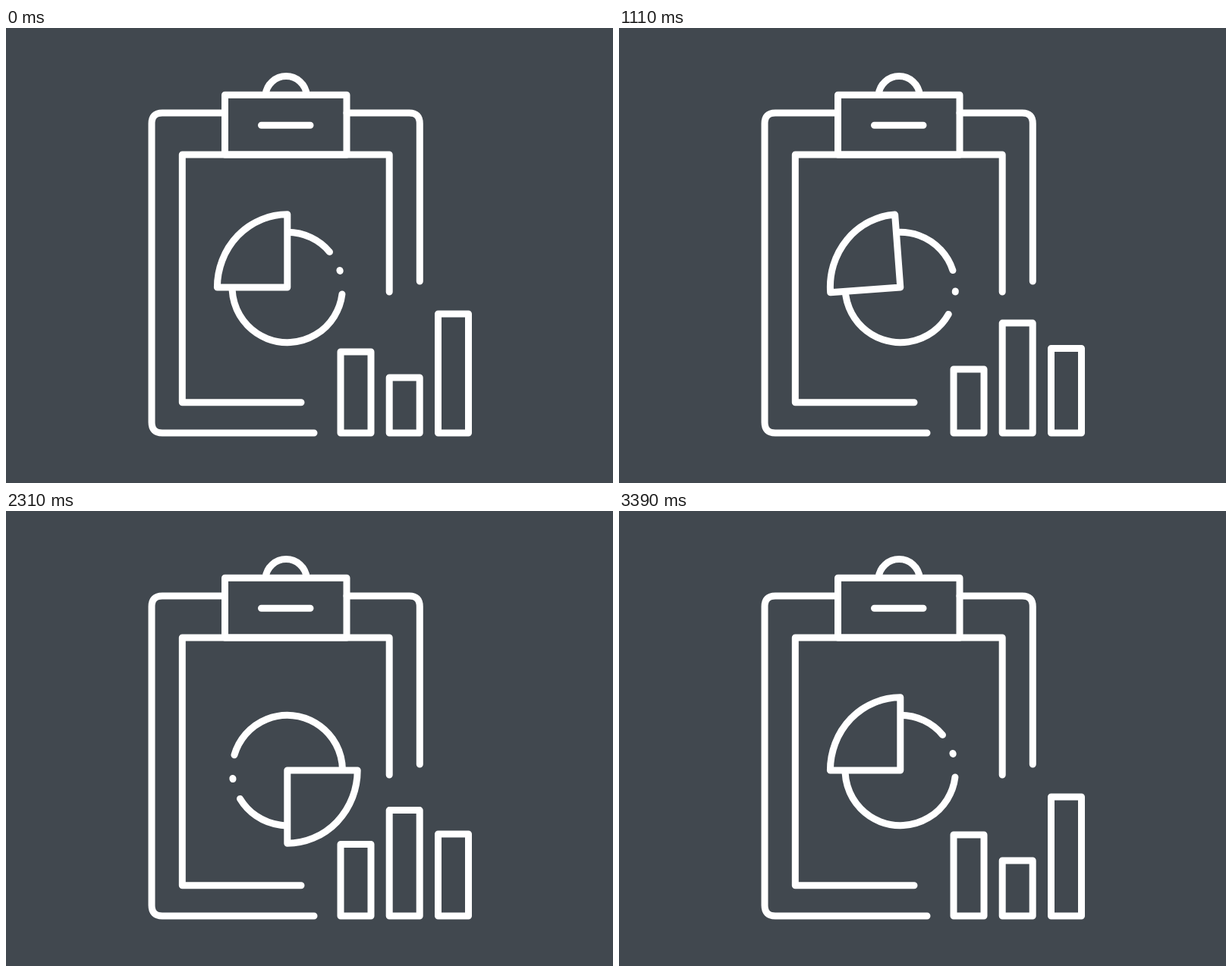
These frames come from a looping animation (800 px wide and 600 px high, 3480 ms). An HTML page:

```html
<!DOCTYPE html>
<html lang="en">
<head>
<meta charset="utf-8">
<title>Clipboard report</title>
<style>
  html, body { margin: 0; width: 100%; height: 100%; overflow: hidden; background: #41484f; }
  svg { display: block; width: 800px; height: 600px; }
</style>
</head>
<body>
<svg viewBox="0 0 800 600" fill="none" stroke="#fff" stroke-width="9" stroke-linecap="round" stroke-linejoin="round">
  <!-- board, paper, clip -->
  <path d="M288.5 112H206Q192 112 192 126V520Q192 534 206 534H406M449 112H531.5Q545.3 112 545.3 126V334"/>
  <path d="M389 493.7H232.3V167H505.2V348"/>
  <path d="M288.5 88.3H449V167H288.5ZM336.5 128.2H401M342 88A27.3 27.3 0 0 1 396.3 88"/>
  <!-- pie -->
  <g transform="translate(370.8 342)">
    <path id="ring"/>
    <path id="wedge" fill="#41484f" d="M0 0V-96.2A92.4 96.2 0 0 0 -92.4 0Z"/>
  </g>
  <g id="bars"></g>
</svg>
<script>
const STEP = 30, LOOP = 3480, FPS = 30, BASE = 534, RISE = 5;
const $ = id => document.getElementById(id);

// Angles in degrees, clockwise from the right
const at = (deg, r = 72.7) => {
  const a = deg * Math.PI / 180;
  return (r * Math.cos(a)).toFixed(2) + ' ' + (r * Math.sin(a)).toFixed(2);
};
const arc = (from, to) =>
  `M${at(from)}A72.7 72.7 0 ${to - from > 180 ? 1 : 0} 1 ${at(to)}`;
$('ring').setAttribute('d', arc(7.1, 320) + arc(-18.1, -17.3));

// Symmetric cubic-bezier(k, 0, 1 - k, 1), solved by bisection
function ease(x, k = 0.88) {
  if (x <= 0) return 0;
  if (x >= 1) return 1;
  let lo = 0, hi = 1, s = 0.5;
  for (let i = 0; i < 30; i++) {
    s = (lo + hi) / 2;
    const q = 1 - s;
    if (3 * k * s * q * q + 3 * (1 - k) * s * s * q + s * s * s < x) lo = s;
    else hi = s;
  }
  return s * s * (3 - 2 * s);
}

// Linear move, then one second of damped swing driven by its speed
function swing(n, start, amp) {
  const f = n - start;
  if (f <= 0) return 0;
  if (f <= RISE) return f / RISE;
  const t = (f - RISE) / FPS;
  if (t >= 1) return 1;
  return 1 + amp * FPS / RISE * Math.sin(4 * Math.PI * t) * Math.exp(-2 * t);
}

const bars = [
  { x: 441, rest: 427, alt: 458, go: 20, back: 74, amp: 0.1 },
  { x: 505.2, rest: 461, alt: 378, go: 22, back: 76, amp: 0.05 },
  { x: 569.5, rest: 377, alt: 426, go: 24, back: 78, amp: 0.1 }
];
for (const b of bars) {
  b.el = document.createElementNS('http://www.w3.org/2000/svg', 'path');
  $('bars').append(b.el);
}

function draw(ms) {
  const n = Math.floor(ms % LOOP / STEP);
  const first = ease((n - 3) / 40), second = ease((n - 57) / 40);
  $('wedge').setAttribute('transform', `rotate(${360 * (first + second)})`);
  $('ring').setAttribute('transform', `rotate(${-342 * first - 378 * second})`);
  for (const b of bars) {
    const top = b.rest + (b.alt - b.rest) * (swing(n, b.go, b.amp) - swing(n, b.back, b.amp));
    b.el.setAttribute('d', `M${b.x} ${BASE}V${top.toFixed(2)}h40V${BASE}Z`);
  }
}

const t0 = performance.now();
function tick() {
  draw(performance.now() - t0);
  requestAnimationFrame(tick);
}
tick();
</script>
</body>
</html>
```
